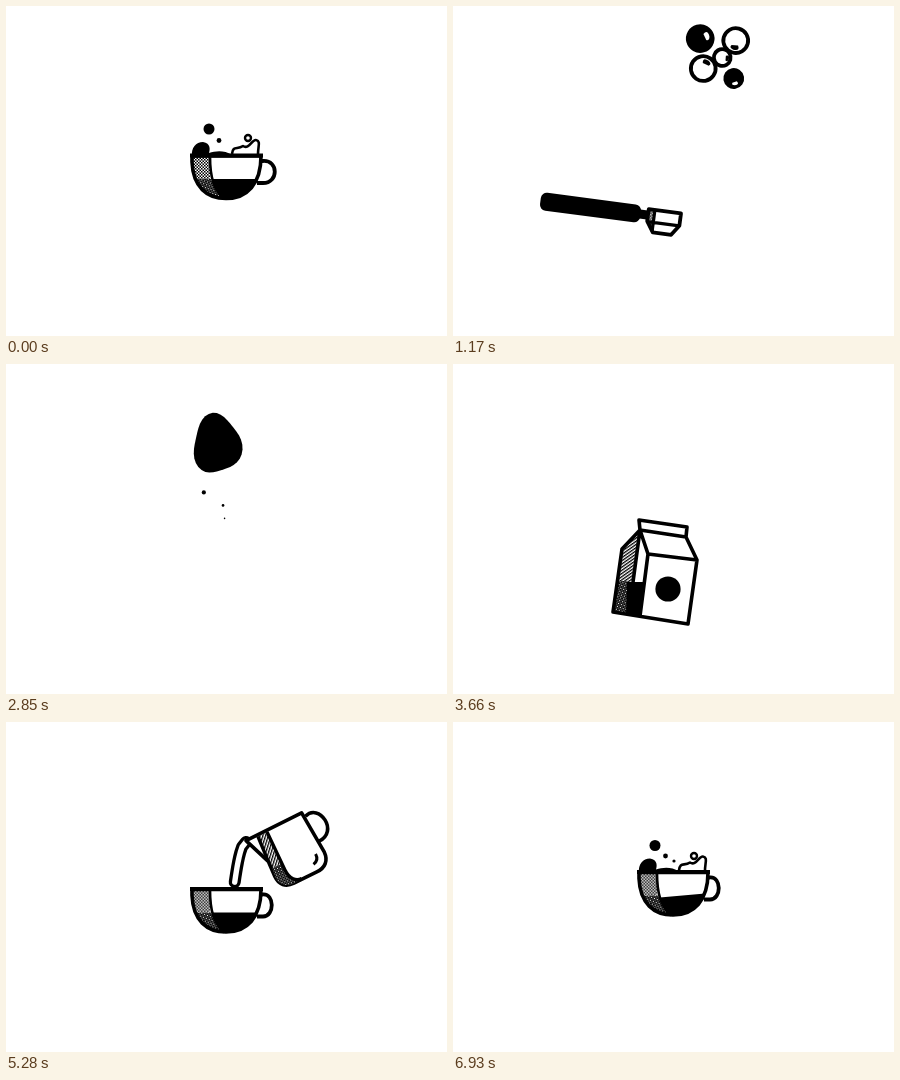
Recreate the animation shown at these times as an HTML page. Size 441x330 px, loop 6.96 s.

```html
<!DOCTYPE html>
<html lang="en">
<head>
<meta charset="utf-8">
<title>Coffee loop</title>
<style>
html, body { margin: 0; width: 100%; height: 100%; overflow: hidden; background: #fff; }
svg { display: block; width: 100vw; height: 100vh; }
</style>
</head>
<body>
<svg viewBox="0 0 441 330" stroke-linejoin="round">
  <defs>
    <pattern id="dots" width="3" height="3" patternUnits="userSpaceOnUse">
      <path d="M0 0h1.5v1.5h-1.5zM1.5 1.5h1.5v1.5h-1.5z"/>
    </pattern>
    <pattern id="dense" width="3" height="3" patternUnits="userSpaceOnUse" patternTransform="rotate(20)">
      <path d="M0 0h3v3h-3z"/><path d="M0 0h1v1h-1zM1.5 1.5h1v1h-1z" fill="#fff"/>
    </pattern>
    <pattern id="hatch" width="2.6" height="2.6" patternUnits="userSpaceOnUse" patternTransform="rotate(-35)">
      <path d="M0 0h2.6v1.3h-2.6z"/>
    </pattern>
    <clipPath id="bowl"><path d="M186 150V156C187 181 201 192.5 220 192.5C241 192.5 255 178 255 150Z"/></clipPath>
    <clipPath id="front"><path d="M204 150C204 172 208 184 218 194H260V150Z"/></clipPath>
  </defs>
  <g id="scene"></g>
</svg>
<script>
const LOOP = 6960, STEP = 30;
const scene = document.getElementById('scene');

// Motion: progress, eased progress, a hump, and a grow-then-shrink lifetime.
const part = (t, a, b) => Math.max(0, Math.min(1, (t - a) / (b - a)));
const ramp = (t, a, b) => { const u = part(t, a, b); return u * u * (3 - 2 * u); };
const bump = (t, a, b) => Math.sin(Math.PI * part(t, a, b));
const life = (t, a, b) => ramp(t, a, a + 150) * (1 - ramp(t, b - 120, b));
const mix = (a, b, u) => a + (b - a) * u;
const arc = (from, to, height, u) =>
  [mix(from[0], to[0], u), mix(from[1], to[1], u) - 4 * height * u * (1 - u)];

// Drawing
const fill = (d, color = '#000') => `<path d="${d}" fill="${color}"/>`;
const line = (d, width, inside = 'none') =>
  `<path d="${d}" fill="${inside}" stroke="#000" stroke-width="${width}"/>`;
const disc = (x, y, r) => `<circle cx="${x}" cy="${y}" r="${r}"/>`;
const ring = (x, y, r, w) =>
  `<circle cx="${x}" cy="${y}" r="${r}" fill="#fff" stroke="#000" stroke-width="${w}"/>`;
const group = (transform, body) => `<g transform="${transform}">${body}</g>`;
const pose = (cx, cy, dx, dy, turn, size, body) => size < .02 ? '' :
  group(`translate(${cx + dx} ${cy + dy}) rotate(${turn}) scale(${size}) translate(${-cx} ${-cy})`, body);
const stretch = (y, k, body) => k < .02 ? '' :
  group(`translate(0 ${y}) scale(1 ${k}) translate(0 ${-y})`, body);

function blob(x, y, rx, ry, phase) {
  const points = Array.from({ length: 40 }, (_, i) => {
    const a = i * Math.PI / 20, k = 1 + .1 * Math.sin(3 * a + phase);
    return `${x + rx * k * Math.cos(a)} ${y + ry * k * Math.sin(a)}`;
  });
  return `M${points.join('L')}Z`;
}

function cupShape(tilt, reach, splash) {
  const bowl = 'M186 150V156C187 181 201 192.5 220 192.5C241 192.5 255 178 255 150Z';
  const bend = 268.7 + reach;
  return stretch(148, splash,
      fill('M186 150C185 142 190 136 197 136C205 137 204 144 203 147C210 145 218 144 226 149Z') +
      line('M226 148C227 139 231 144 237 140C243 144 246 133 250 134C255 135 252 140 252 148', 2.6, '#fff')) +
    line(`M255 155H257C${bend} 154 ${bend} 177 257 177H251`, 3.8) + fill(bowl, '#fff') +
    `<g clip-path="url(#bowl)">${fill('M186 150H204V173H186Z', 'url(#dots)')}${fill('M186 173H205L218 194H186Z', 'url(#dense)')}
     <g clip-path="url(#front)">${group(`rotate(${tilt} 230 173)`, fill('M180 173H280V215H180Z'))}</g></g>` +
    line('M204 150C204 172 208 184 218 193', 2.6) + line(bowl, 3.6) + line('M184 149.5H257', 4);
}

function leavingCup(t) {
  const u = part(t, 0, 420), fall = ramp(t, 0, 300), s = 1 - fall;
  if (u === 1) return '';
  return pose(220, 170, 36 * u * u, 78 * ramp(t, 0, 420), 24 * u, 1 - u ** 4,
      cupShape(9 * Math.sin(t / 90), 4 * s, s)) +
    disc(203, 123 + 40 * fall, 5.5 * s) + disc(213, 134.5 + 40 * fall, 2.4 * s) +
    ring(242, 132 + 40 * fall, 3 * s, 2.4 * s);
}

function returningCup(t) {
  if (t < 5100) return '';
  const since = Math.max(0, t - 6480);
  const rebound = Math.exp(-since / 100) * Math.cos(since / 75);
  const dy = (mix(16, 33, ramp(t, 5100, 6090)) + 12 * ramp(t, 6090, 6360)) * rebound;
  const tilt = -5 * Math.cos((t - 6930) / 130) * ramp(t, 6120, 6400);
  const splash = ramp(t, 6340, 6480) * (1 + .8 * bump(t, 6340, 6930));
  const drops = t < 6360 ? '' : [[202, 123.5, 5.5], [212.5, 134, 2.4], [221, 139, 1.6], [241, 134, 3]].map(([x, y, r], i) => {
    const [px, py] = arc([x, 180], [x, y], 62 - 4 * i, Math.sqrt(part(t, 6360, 6930)));
    return i < 3 ? disc(px, py, r) : ring(px, py, r, 2.4);
  }).join('');
  return pose(220, 170, 0, dy, -1.6 * bump(t, 5880, 6300), ramp(t, 5100, 5250),
    cupShape(tilt, 0, splash)) + drops;
}

function basket(w, full) {
  const col = mix(7, 14, part(w, 33, 51));
  return stretch(-5, full,
      fill(`M-1 -5C2 -13 7 -13 12 -22C17 -30 25 -31 30 -25C36 -20 ${w - 6} -20 ${w - 2} -15L${w + 1} -5Z`)) +
    line(`M1 -6H${w}V6.5L${w - 7} 16.5H8L1 6Z`, 3.8, '#fff') +
    fill(`M2 -6H${col}V16H8L2 6Z`, 'url(#dots)') +
    line(`M1 6.5H${w}M${col} -6V16`, 3.2) +
    (full > .1 ? fill(`M1 -6H${w}V-2.5H1ZM10 14H32L29 ${16 + 8 * full}H22Z`) : '');
}

function scoop(t) {
  const size = life(t, 360, 2160);
  if (!size) return '';
  const aim = ramp(t, 1170, 2010), len = mix(101, 90, aim);
  const x = mix(266, 194, ramp(t, 360, 1080)) - 10 * bump(t, 900, 1170) + 12 * aim;
  const y = 209 + 41 * bump(t, 480, 840) - 14 * bump(t, 840, 1170) + 24 * aim + 4 * bump(t, 1740, 1950);
  const turn = 7.5 - 18 * bump(t, 780, 1140) + 21 * aim;
  const full = ramp(t, 1650, 1790) * (1 + .3 * bump(t, 1650, 1950));
  return group(`translate(${x} ${y}) rotate(${turn}) scale(${size})`,
    `<rect x="${-6.5 - len}" y="-9" width="${len}" height="18" rx="6"/>` +
    fill('M-9 -4.5H2V4.5H-9Z') + basket(mix(33.5, 51, aim), full));
}

const bubbles = [
  { x: -18, y: -15, r: 14.3, solid: true, shine: -15 },
  { x: 17.5, y: -13, r: 14.3, shine: 105 },
  { x: 4, y: 4, r: 10.3, shine: 15 },
  { x: -15, y: 15, r: 14.3, shine: -55 },
  { x: 15.5, y: 25, r: 10.4, solid: true, shine: 80 },
];

function toss(t) {
  const u = part(t, 780, 1770), grow = Math.min(1, 3 * Math.sin(Math.PI * u));
  if (u === 0 || u === 1) return '';
  const [x, y] = arc([232, 196], [230, 224], 167, u);
  const drift = 36 * Math.sin(Math.PI * u);
  return group(`translate(${x + drift} ${y}) rotate(${240 * (u - .394)}) scale(${grow})`,
    bubbles.map(({ x, y, r, solid, shine }) => group(`translate(${x} ${y}) rotate(${shine})`,
      (solid ? disc(0, 0, r) : ring(0, 0, r - 1.9, 3.8)) +
      fill(`M${r * .3} ${-r * .25}Q${r * .65} ${-r * .5} ${r * .66} 0Q${r * .6} ${r * .35} ${r * .38} ${r * .2}Z`,
        solid ? '#fff' : '#000'))).join(''));
}

function coffee(t) {
  const u = part(t, 2080, 3180);
  if (u === 0 || u === 1) return '';
  const x = mix(222, 206, u), y = mix(214, 226, u) - 158 * (1 - Math.abs(2 * u - 1) ** 2.5);
  const size = Math.min(1, 3 * Math.sin(Math.PI * u)), speed = Math.abs(2 * u - 1);
  const trail = bump(t, 2220, 2940);
  return fill(blob(x, y, size * (27 - 8 * speed), size * (26 + 8 * speed), t / 110)) +
    [5.5, 3.5, 2].map((r, i) => disc(x + 13 * Math.sin(i * 2 - 1.5), y + 48 + 13 * i, r * trail)).join('');
}

function carton(t) {
  const hop = bump(t, 3780, 4170), enter = 1 - ramp(t, 3090, 3300);
  return pose(203, 210, 18 * hop, -34 * hop, 22 * hop - 20 * enter, life(t, 3090, 4170),
    fill('M187 166L169 185L160 248L187 252L235 260L244 196L233 173L234 163L186 156Z', '#fff') +
    fill('M186 168L170 186L165 218H180Z', 'url(#hatch)') +
    fill('M165 217L161 248L174 250V217Z', 'url(#dense)') + fill('M174 218H191L187 252L173 250Z') +
    line('M187 166L169 185L160 248L235 260L244 196L233 173L187 166L195 190L187 252M195 190L244 196M187 166L180 218M187 166L186 156L234 163L233 173', 3.6) +
    disc(215, 225, 12.6));
}

function jug(t) {
  const dx = 86 * ramp(t, 4650, 5160);
  const dy = 16 * bump(t, 4380, 4560) + 72 * bump(t, 4590, 5000) - 45 * ramp(t, 4800, 5220);
  const pour = ramp(t, 5040, 5340) * (1 - ramp(t, 5550, 5760));
  const splash = ramp(t, 4390, 4470) * (1 + .6 * bump(t, 4390, 4590)) * (1 - ramp(t, 4650, 4890));
  return pose(203, 165, dx, dy, -42 * pour, life(t, 4110, 5760),
    stretch(140, splash, line('M177 138C179 122 191 121 195 130C196 138 206 130 208 143', 3.3, '#fff')) +
    line('M227 151C246 148 245 184 222 179', 3.6) +
    line('M165 134L226 146L220 191C218 200 211 204 202 202L177 197C168 195 164 189 166 180L170 164Z', 3.6, '#fff') +
    fill('M176 138L187 140L180 174L169 172Z', 'url(#hatch)') +
    fill('M169 172L180 174C176 186 177 192 185 198L177 197C168 195 164 189 166 180Z', 'url(#dense)') +
    line('M187 140L178 181C176 191 180 197 186 198M177 138L170 164', 3.3) +
    line('M204 194Q211 194 212 187', 3));
}

function milk(t) {
  let out = '';
  const leap = part(t, 3900, 4440), bead = part(t, 4400, 4770);
  if (leap > 0 && leap < 1) {
    const [x, y] = arc([222, 158], [198, 136], 92, leap);
    const size = Math.min(1, 2 * Math.sin(Math.PI * leap)), speed = Math.abs(2 * leap - 1);
    out += line(blob(x, y, size * (17 - 5 * speed), size * (16 + 5 * speed), t / 90), 3.4, '#fff');
  }
  if (bead > 0 && bead < 1) {
    const [x, y] = arc([201, 138], [210, 150], 20, bead), size = Math.sin(Math.PI * bead);
    out += ring(x, y, 4.4 * size, 3.4 * size);
  }
  if (t > 5190 && t < 5670) {
    const head = ramp(t, 5190, 5340), tail = ramp(t, 5520, 5670);
    const points = Array.from({ length: 9 }, (_, i) => {
      const u = mix(tail, head, i / 8);
      return `${240 - 14 * Math.sqrt(u)} ${120 + 62 * u}`;
    });
    const stream = (color, width) =>
      `<path d="M${points.join('L')}" fill="none" stroke="${color}" stroke-width="${width}" stroke-linecap="round"/>`;
    out += stream('#000', 12) + stream('#fff', 5.4);
  }
  return out;
}

const layers = [toss, scoop, coffee, carton, milk, jug, leavingCup, returningCup];

function draw(time) {
  const t = Math.floor((time % LOOP) / STEP) * STEP;
  scene.innerHTML = layers.map(layer => layer(t)).join('');
}

const begin = performance.now();
function frame() {
  draw(performance.now() - begin);
  requestAnimationFrame(frame);
}
frame();
</script>
</body>
</html>
```
